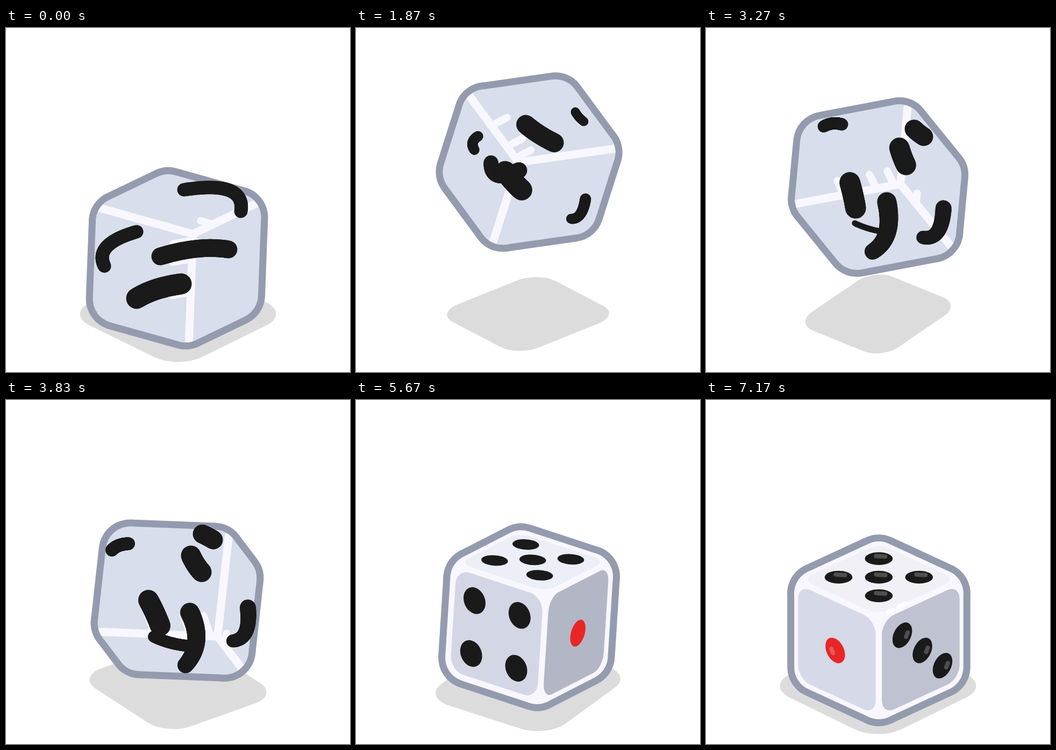
Recreate the animation shown at these times as an HTML page with a canvas. Size 640x640 px, loop 7210 ms.

```html
<!DOCTYPE html>
<html lang="en">
<head>
<meta charset="utf-8">
<title>Rolling die</title>
<style>
html, body { margin: 0; width: 100%; height: 100%; overflow: hidden; background: #fff; }
canvas { display: block; width: 100vw; height: 100vh; }
</style>
</head>
<body>
<canvas id="stage" width="640" height="640"></canvas>
<script>
const LOOP = 7210, BLUR_END = 4020, REST_Y = 428.5;
const stage = document.getElementById('stage').getContext('2d');
const layerCanvas = document.createElement('canvas');
layerCanvas.width = layerCanvas.height = 640;
const layer = layerCanvas.getContext('2d');

const lerp = (a, b, p) => a + (b - a) * p;
const mix = (a, b, p) => a.map((v, i) => lerp(v, b[i], p));
const clamp = v => Math.max(0, Math.min(1, v));
const ramp = (t, from, to) => clamp((t - from) / (to - from));

// Hops: start, end, height
const hops = [[30, 2420, 253], [2420, 4020, 133], [4020, 5150, 58], [5150, 5990, 26], [5990, 6400, 3]];

// Poses: time, centre x, then the projected normals of faces 1, 3 and 5
const poses = [
  [0, 318, [8, -200], [177, 50], [125, -60]],
  [1030, 322, [-142, 158], [-128, -136], [-76, -7]],
  [2730, 322, [159, -84], [-28, 85], [137, 145]],
  [3830, 318.5, [218, 9], [-21, 187], [47, 62]],
  [4570, 322.5, [153, -170], [125, 112], [92, 78]],
  [5670, 322, [175, 57], [120, -62], [13, -205]],
  [6700, 321.5, [-156, 72], [156, 72], [0, -190]]
].map(([t, x, a, b, c]) => ({ t, x, ...decompose(a, b, c) }));

// Split the projection into a rotation and a small planar stretch
function decompose(...n) {
  const sum = f => n.reduce((s, v) => s + f(v), 0);
  const A = sum(v => v[0] * v[0]), B = sum(v => v[0] * v[1]), D = sum(v => v[1] * v[1]);
  const s = Math.sqrt(A * D - B * B), k = Math.sqrt(A + D + 2 * s);
  const m = [(A + s) / k, B / k, (D + s) / k];
  const r1 = n.map(v => (m[2] * v[0] - m[1] * v[1]) / s);
  const r2 = n.map(v => (m[0] * v[1] - m[1] * v[0]) / s);
  const r3 = [0, 1, 2].map(i => {
    const j = (i + 1) % 3, l = (i + 2) % 3;
    return r1[j] * r2[l] - r1[l] * r2[j];
  });
  return { m, q: toQuat(r1, r2, r3) };
}

function toQuat(a, b, c) {
  const half = v => Math.sqrt(Math.max(0, 1 + v)) / 2;
  const signed = (v, s) => s < 0 ? -v : v;
  return [
    half(a[0] + b[1] + c[2]),
    signed(half(a[0] - b[1] - c[2]), c[1] - b[2]),
    signed(half(b[1] - a[0] - c[2]), a[2] - c[0]),
    signed(half(c[2] - a[0] - b[1]), b[0] - a[1])
  ];
}

function slerp(a, b, p) {
  let dot = a.reduce((s, v, i) => s + v * b[i], 0);
  const sign = dot < 0 ? -1 : 1;
  const w = Math.acos(Math.min(1, dot * sign));
  if (w < 1e-4) return a;
  return a.map((v, i) => (v * Math.sin((1 - p) * w) + sign * b[i] * Math.sin(p * w)) / Math.sin(w));
}

function toRows([w, x, y, z]) {
  return [
    [1 - 2 * (y * y + z * z), 2 * (x * y - w * z), 2 * (x * z + w * y)],
    [2 * (x * y + w * z), 1 - 2 * (x * x + z * z), 2 * (y * z - w * x)],
    [2 * (x * z - w * y), 2 * (y * z + w * x), 1 - 2 * (x * x + y * y)]
  ];
}

function span(keys, time, t) {
  let i = 0;
  while (i < keys.length - 2 && t >= time(keys[i + 1])) i++;
  return [i, ramp(t, time(keys[i]), time(keys[i + 1]))];
}

function poseAt(t) {
  let [i, p] = span(poses, k => k.t, t);
  const seg = i, raw = p;
  if (i === poses.length - 2) p = 1 - (1 - p) ** 2;
  const a = poses[i], b = poses[i + 1];
  const m = mix(a.m, b.m, p), r = toRows(slerp(a.q, b.q, p));
  const n = [0, 1, 2].map(k => ({
    x: m[0] * r[0][k] + m[1] * r[1][k],
    y: m[1] * r[0][k] + m[2] * r[1][k],
    z: r[2][k]
  }));
  return { n, x: lerp(a.x, b.x, p), y: REST_Y - lift(t), seg, p: raw };
}

function lift(t) {
  const hop = hops.find(h => t >= h[0] && t < h[1]);
  if (!hop) return 0;
  const u = 2 * (t - hop[0]) / (hop[1] - hop[0]) - 1;
  return hop[2] * (1 - u * u);
}

// Shadow: time, then two half sides of the parallelogram
const shadows = [
  [0, 104, 51, 104, -51],
  [1030, 92, -19.5, -45, -34],
  [1450, 90, -28, -55, -35],
  [2420, 102, -52, -104, -46],
  [2730, 64, -60, -102, -25],
  [3200, 70, -52, -80, -30],
  [3830, 104, -37, -83, -54],
  [4020, 106, -44, -104, -50],
  [4570, 20, -78, -122, -12],
  [5150, 92, -60, -112, -42],
  [5670, 80, -58, -115, -37],
  [6100, 104, -51, -104, -51]
];

function drawShadow(t) {
  const [i, p] = span(shadows, k => k[0], t);
  const [, ax, ay, bx, by] = mix(shadows[i], shadows[i + 1], p);
  stage.save();
  stage.transform(ax, ay, bx, by, 320, 532);
  stage.fillStyle = '#dcdcdc';
  stage.beginPath();
  stage.roundRect(-1, -1, 2, 2, 0.42);
  stage.fill();
  stage.restore();
}

// Streaks left by the spinning pips: start, bend, end, widths
const streaks = [
  {
    a: [331, 301, 446, 283, 437, 341, 25, 25],
    b: [243, 379, 163, 402, 183, 443, 25, 25],
    c: [287, 425, 360, 403, 414, 412, 33, 33],
    d: [243, 503, 275, 483, 326, 476, 39, 39]
  },
  {
    b: [276, 181, 173, 154, 216, 68, 25, 25],
    c: [258, 106, 300, 127, 358, 140, 33, 33],
    d: [285, 233, 312, 247, 346, 254, 39, 39],
    e: [201, 266, 160, 243, 178, 212, 17, 17],
    f: [420, 255, 420, 270, 414, 282, 12, 12]
  },
  {
    b: [331, 378, 332, 455, 287, 465, 36, 30],
    c: [375, 282, 377, 299, 380, 316, 38, 38],
    d: [270, 329, 271, 353, 270, 377, 39, 39],
    e: [240, 214, 262, 207, 277, 218, 21, 22],
    f: [434, 410, 422, 472, 386, 457, 30, 25],
    g: [408, 252, 414, 263, 424, 270, 34, 34]
  },
  {
    h: [275, 440, 302, 453, 336, 457, 22, 22],
    b: [342, 395, 370, 452, 334, 493, 36, 30],
    c: [344, 289, 352, 307, 364, 320, 37, 37],
    d: [265, 372, 278, 396, 287, 420, 38, 38],
    e: [197, 279, 207, 268, 228, 267, 24, 24],
    f: [450, 386, 456, 445, 422, 448, 30, 24],
    g: [365, 249, 376, 254, 386, 260, 35, 35]
  }
].map((set, i) => {
  const cx = poses[i].x, cy = REST_Y - lift(poses[i].t);
  return Object.fromEntries(Object.entries(set).map(([name, s]) =>
    [name, s.map((v, k) => k > 5 ? v : v - (k % 2 ? cy : cx))]));
});

const thin = s => s.map((v, k) => k > 5 ? 0 : v);

function drawStreaks(pose) {
  const from = streaks[pose.seg], to = streaks[pose.seg + 1] || from;
  stage.save();
  stage.translate(pose.x, pose.y);
  stage.lineCap = 'round';
  stage.strokeStyle = '#1a1a1a';
  for (const name of 'abcdefgh') {
    const a = from[name] || to[name] && thin(to[name]);
    if (!a) continue;
    const [x0, y0, bx, by, x1, y1, w0, w1] = mix(a, to[name] || thin(a), pose.p);
    if (w0 < 2) continue;
    const at = (u, p, q, r) => (1 - u) ** 2 * p + 2 * u * (1 - u) * q + u * u * r;
    const steps = 32;
    for (let i = 0; i < steps; i++) {
      const u = i / steps, v = (i + 1) / steps;
      stage.lineWidth = lerp(w0, w1, u);
      stage.beginPath();
      stage.moveTo(at(u, x0, bx, x1), at(u, y0, by, y1));
      stage.lineTo(at(v, x0, bx, x1), at(v, y0, by, y1));
      stage.stroke();
    }
  }
  stage.restore();
}

const D = 0.24;
const corners = [[-D, -D], [D, -D], [-D, D], [D, D]];
const pips = {
  1: [[0, 0]],
  2: [[-D, D], [D, -D]],
  3: [[-D, -D], [0, 0], [D, D]],
  4: corners,
  5: [...corners, [0, 0]],
  6: [...corners, [-D, 0], [D, 0]]
};
const values = [[1, 6], [3, 4], [5, 2]];

function visibleFaces(n) {
  return n.map((v, i) => {
    const s = v.z < 0 ? 1 : -1;
    return { i, s, x: s * v.x, y: s * v.y, u: n[(i + 1) % 3], v: n[(i + 2) % 3], value: values[i][s > 0 ? 0 : 1] };
  });
}

function drawBody(faces, radius, color) {
  const k = 0.36;
  layer.fillStyle = layer.strokeStyle = color;
  layer.lineWidth = radius * 2;
  layer.lineJoin = 'round';
  for (const f of faces) {
    layer.beginPath();
    for (const [a, b] of [[1, 1], [1, -1], [-1, -1], [-1, 1]])
      layer.lineTo(k * (f.x + a * f.u.x + b * f.v.x), k * (f.y + a * f.u.y + b * f.v.y));
    layer.closePath();
    layer.fill();
    layer.stroke();
  }
}

function line(ctx, x0, y0, x1, y1, width, color) {
  ctx.lineCap = 'round';
  ctx.lineWidth = width;
  ctx.strokeStyle = color;
  ctx.beginPath();
  ctx.moveTo(x0, y0);
  ctx.lineTo(x1, y1);
  ctx.stroke();
}

function drawEdges(faces) {
  const white = '#f8f7ff';
  const vx = faces.reduce((s, f) => s + f.x, 0) / 2, vy = faces.reduce((s, f) => s + f.y, 0) / 2;
  for (const f of faces) line(layer, vx, vy, vx - f.x, vy - f.y, 15, white);
  const [a, b, c] = faces;
  const tick = (edge, along, dx, dy) => {
    const x = vx - edge.x * along, y = vy - edge.y * along;
    line(layer, x, y, x + dx, y + dy, 14, white);
  };
  for (const along of [0.06, 0.23, 0.54])
    tick(a, along, -0.2 * b.x - 0.08 * a.x, -0.2 * b.y - 0.08 * a.y);
  tick(c, 0.3, -0.13 * b.x, -0.13 * b.y);
}

function faceColor(f, calm) {
  const c = lerp(207, 213, calm) - lerp(24, 15.7, calm) * f.x / 212 - 32 * f.y / 212;
  return `rgb(${Math.min(241, c)},${Math.min(240, c + 3)},${Math.min(247, c + 18)})`;
}

function drawFace(f, calm, shine) {
  const { u, v } = f;
  layer.save();
  layer.transform(u.x, u.y, v.x, v.y, f.x * 0.5, f.y * 0.5);
  layer.fillStyle = faceColor(f, calm);
  layer.beginPath();
  layer.roundRect(-0.463, -0.463, 0.926, 0.926, 0.14);
  layer.fill();
  layer.restore();

  layer.save();
  layer.transform(u.x, u.y, v.x, v.y, f.x * 0.52, f.y * 0.52);
  layer.fillStyle = f.value === 1 ? '#e82626' : '#1a1a1a';
  for (const [x, y] of pips[f.value]) {
    layer.beginPath();
    layer.arc(x, y, 0.117, 0, 7);
    layer.fill();
  }
  layer.restore();

  if (!shine) return;
  const [x0, y0, x1, y1] = f.y < -100 ? [-5, -5, 12, -4] : f.x > 0 ? [10, -5, 7, 3] : [-7, -3, -4, 5];
  for (const [a, b] of pips[f.value]) {
    const x = f.x * 0.52 + a * u.x + b * v.x, y = f.y * 0.52 + a * u.y + b * v.y;
    line(layer, x + x0, y + y0, x + x1, y + y1, 8, `rgba(255,255,255,${0.23 * shine})`);
  }
}

function draw(t) {
  const pose = poseAt(t), faces = visibleFaces(pose.n), blurred = t < BLUR_END;
  const shine = ramp(t, 6550, 6950);
  layer.setTransform(1, 0, 0, 1, 0, 0);
  layer.clearRect(0, 0, 640, 640);
  layer.translate(pose.x, pose.y);
  drawBody(faces, 45, blurred ? '#d8deeb' : '#f8f7ff');
  layer.globalCompositeOperation = 'source-atop';
  if (blurred) drawEdges(faces);
  else {
    for (const f of faces) drawFace(f, ramp(t, 5700, 6600), shine);
    if (shine) {
      const glint = `rgba(255,255,255,${shine})`;
      line(layer, 18, -34.5, 26, -38, 8, glint);
      line(layer, 37, -43.5, 49, -49.5, 8, glint);
    }
  }
  layer.globalCompositeOperation = 'destination-over';
  drawBody(faces, 58, '#949bae');
  layer.globalCompositeOperation = 'source-over';

  stage.fillStyle = '#fff';
  stage.fillRect(0, 0, 640, 640);
  drawShadow(t);
  stage.drawImage(layerCanvas, 0, 0);
  if (blurred) drawStreaks(pose);
}

const start = performance.now();
function tick(now) {
  draw(Math.max(0, now - start) % LOOP);
  requestAnimationFrame(tick);
}
draw(0);
requestAnimationFrame(tick);
</script>
</body>
</html>
```
